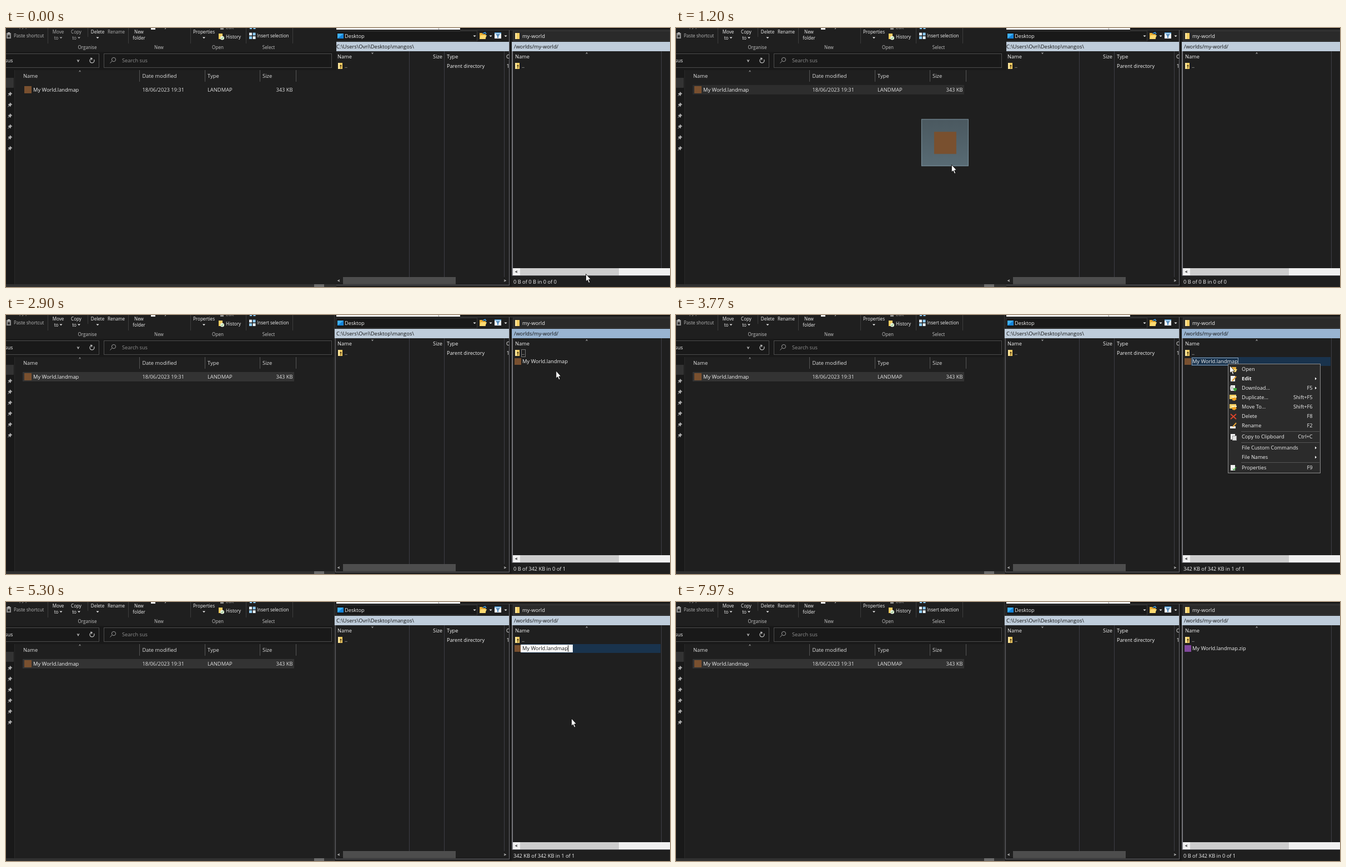
Animation of 1196 by 468 pixels, one loop 8030 ms. Source, as an HTML page with a canvas:

```html
<!DOCTYPE html>
<html lang="en">
<head>
<meta charset="utf-8">
<title>Renaming an uploaded file</title>
<style>
html, body { margin: 0; width: 100%; height: 100%; overflow: hidden; background: #1f1f1f; }
canvas { display: block; width: 1196px; height: 468px; }
</style>
</head>
<body>
<canvas id="stage" width="1196" height="468"></canvas>
<script>
const c = document.getElementById('stage').getContext('2d');
const LOOP = 8030, BROWN = '#79502f', PURPLE = '#81489c', YELLOW = '#f5cd62';
const FILE = 'My World.landmap';

// Pointer stops: time, x, y
const PATH = [
  [0, 1044, 444], [30, 1044, 444], [470, 104, 115], [800, 104, 115],
  [970, 143, 162], [1130, 370, 236], [1330, 720, 240], [1600, 1019, 150],
  [2400, 1019, 150], [2930, 990, 100], [3170, 990, 100], [3400, 997, 91],
  [3770, 997, 91], [4230, 1018, 205], [4570, 1018, 205], [4670, 1018, 210],
  [6100, 1018, 210], [6130, 1017, 210], [7270, 1017, 210], [7700, 108, 470], [LOOP, 108, 470]
];

// Label, middle y, shortcut, submenu
const MENU = [
  ['Open', 98], ['Edit', 115, '', 1], ['Download...', 132, 'F5', 1],
  ['Duplicate...', 149, 'Shift+F5'], ['Move To...', 166, 'Shift+F6'],
  ['Delete', 183, 'F8'], ['Rename', 200, 'F2'],
  ['Copy to Clipboard', 220, 'Ctrl+C'], ['File Custom Commands', 240, '', 1],
  ['File Names', 257, '', 1], ['Properties', 276, 'F9']
];

function rect(x, y, w, h, color) { c.fillStyle = color; c.fillRect(x, y, w, h); }
function frame(x, y, w, h, color) {
  c.strokeStyle = color; c.lineWidth = 1;
  c.strokeRect(x + .5, y + .5, w - 1, h - 1);
}
function line(color, width, ...p) {
  c.strokeStyle = color; c.lineWidth = width;
  c.beginPath();
  for (let i = 0; i < p.length; i += 2) c.lineTo(p[i], p[i + 1]);
  c.stroke();
}
function poly(color, ...p) {
  c.fillStyle = color;
  c.beginPath();
  for (let i = 0; i < p.length; i += 2) c.lineTo(p[i], p[i + 1]);
  c.closePath(); c.fill();
}
function font(size, bold) { c.font = `${bold ? 'bold ' : ''}${size}px "Open Sans", "Noto Sans", sans-serif`; }
function text(s, x, y, color = '#f2f2f2', size = 9.25, align = 'left', bold = false) {
  font(size, bold);
  c.fillStyle = color; c.textAlign = align;
  c.fillText(s, x, y + size * .36);
}
function caret(x, y, color = '#fff') { poly(color, x - 2.5, y - 1, x + 2.5, y - 1, x, y + 1.6); }
function chevron(x, y, dx, dy, color, width = 1) {
  // Points along (dx, dy)
  line(color, width, x - dx + dy, y - dy + dx, x + dx, y + dy, x - dx - dy, y - dy - dx);
}

function pointer(t) {
  let i = 0;
  while (i < PATH.length - 2 && t >= PATH[i + 1][0]) i++;
  const a = PATH[i], b = PATH[i + 1], d = b[0] - a[0], u = (t - a[0]) / d;
  const still = (p, q) => !p || !q || (p[1] === q[1] && p[2] === q[2]);
  const slope = (k, j) => still(PATH[k - 1], PATH[k]) || still(PATH[k], PATH[k + 1]) ? 0
    : (PATH[k + 1][j] - PATH[k - 1][j]) / (PATH[k + 1][0] - PATH[k - 1][0]) * d;
  return [1, 2].map(j => {
    const m = slope(i, j), n = slope(i + 1, j), e = u * u * (3 - 2 * u);
    return a[j] + (b[j] - a[j]) * e + m * u * (1 - u) ** 2 - n * u * u * (1 - u);
  });
}

function ribbon(enabled) {
  const dim = enabled ? '#f2f2f2' : '#b0b0b0';
  const small = (s, x, y, color = '#f2f2f2', align = 'center') => text(s, x, y, color, 8.1, align);
  for (const [x, h] of [[75, 28], [147, 16], [220, 28], [332, 28], [432, 28], [516, 28]]) rect(x, 0, 1, h, '#3d3d3d');
  small('Copy path', 14, -3, '#aaa', 'left');
  rect(1, 9, 8, 10, '#8d8d8d'); rect(3, 8, 4, 2, '#c5c5c5'); rect(3, 13, 4, 4, '#333');
  small('Paste shortcut', 14, 14, '#b8b8b8', 'left');
  small('Move', 94, 7, dim); small('to', 90.5, 18, dim); caret(99, 17.5, dim);
  small('Copy', 126.5, 7, dim); small('to', 123, 18, dim); caret(131.5, 17.5, dim);
  small('Delete', 165, 7); caret(165, 17.5);
  small('Rename', 198.5, 7, dim);
  small('New', 239.5, 7); small('folder', 239.5, 18);
  rect(261, 0, 8, 3, '#e8e8e8');
  small('Easy access', 273, -3, '#f2f2f2', 'left');
  small('Properties', 356.5, 7); caret(356.5, 17.5);
  rect(386, 0, 6, 3, '#888');
  small('Edit', 396, -1, '#999', 'left');
  rect(383, 10, 7, 10, YELLOW);
  c.fillStyle = '#e7f3e0'; c.beginPath(); c.arc(389.5, 18, 3.6, 0, 7); c.fill();
  line('#4b9a45', 1, 387.5, 18, 389, 19.5, 391.5, 16.5);
  small('History', 396, 16, '#f2f2f2', 'left');
  for (const x of [438, 444.5]) {
    rect(x + 1, 0, 4, 2, '#7fc0f0');
    rect(x, 8.5, 5, 5, x < 440 ? '#e8f5ff' : '#8dcbf5'); rect(x, 15, 5, 5, x < 440 ? '#8dcbf5' : '#e8f5ff');
  }
  small('Insert selection', 452, 14, '#f2f2f2', 'left');
  [['Organise', 146.5], ['New', 275.5], ['Open', 381.5], ['Select', 473]]
    .forEach(([s, x]) => small(s, x, 35, '#c4c4c4'));
}

function explorer(t) {
  rect(0, 0, 596, 468, '#1f1f1f');
  rect(0, 43, 596, 33, '#191919');
  rect(0, 76, 15, 387, '#191919');
  rect(15, 76, 1, 387, '#2a2a2a');
  ribbon(t >= 800);

  frame(-2, 46, 170, 26, '#4c4c4c');
  frame(176, 46, 411, 26, '#4c4c4c');
  text('sus', -2, 59);
  chevron(130, 59, 0, 1.7, '#c8c8c8', 1.2);
  c.strokeStyle = '#c8c8c8'; c.lineWidth = 1.2;
  c.beginPath(); c.arc(155, 59, 4, -.5, 4.6); c.stroke();
  line('#c8c8c8', 1.2, 152.2, 54.2, 155, 55, 154, 58);
  c.strokeStyle = '#999'; c.lineWidth = 1;
  c.beginPath(); c.arc(194, 57, 3.6, 0, 7); c.stroke();
  line('#999', 1, 191.2, 59.6, 187.5, 63.5);
  text('Search sus', 209, 59, '#8e8e8e');

  rect(0, 90, 14, 18, '#333');
  for (let i = 0; i < 6; i++) {
    const y = 119 + i * 19.6;
    poly('#aaa', 7, y - 4, 11.5, y, 9.5, y + .5, 8, y + 4, 3.5, y - .5, 7, y - 2);
    line('#aaa', 1, 6, y + 1, 3.5, y + 4);
  }

  [240, 358, 457, 522].forEach(x => rect(x, 76, 1, 21, '#555'));
  chevron(133, 78, 0, -1.3, '#999');
  [['Name', 31], ['Date modified', 245.5], ['Type', 363], ['Size', 462]]
    .forEach(([s, x]) => text(s, x, 87, '#dedede', 9.4));
  if (t > 435) rect(30, 103, 489, 17, t < 1600 ? '#2d2d2d' : '#333');
  rect(33, 105, 13, 13, BROWN);
  text(FILE, 49, 112, '#f2f2f2', 9.3);
  text('18/06/2023 19:31', 245.5, 112, '#dedede', 9.3);
  text('LANDMAP', 363, 112, '#dedede', 9.4);
  text('343 KB', 516.5, 112, '#dedede', 9.3, 'right');

  rect(0, 463, 596, 5, '#303030');
  rect(555, 463, 18, 5, '#6b6b6b');
}

function upFolder(x) {
  rect(x, 63, 8, 11, YELLOW); rect(x, 63, 3, 11, '#fbe49a');
  poly('#46391a', x + 3, 69, x + 5, 66, x + 7, 69);
  rect(x + 4.5, 68, 1, 5, '#46391a');
}

function localPane() {
  rect(595, 0, 223, 3, '#f2f2f2'); rect(779, 0, 1, 3, '#999');
  rect(818, 0, 378, 3, '#151515'); rect(818, 3, 378, 1, '#444');
  rect(594, 5, 255, 19, '#191919');
  frame(594, 5, 255, 19, '#383838');
  rect(597, 10, 11, 9, '#1683d8'); poly('#3fb0f4', 597, 10, 608, 10, 597, 19);
  text('Desktop', 610, 15);
  [844, 873, 900].forEach(x => caret(x, 14.5));
  poly('#e8ae35', 853, 9, 858, 9, 859, 11, 864, 11, 864, 20, 853, 20);
  poly('#ffdb72', 855, 13, 866, 13, 863, 20, 853, 20);
  line('#3d9be0', 1.5, 859, 10, 863, 8, 865, 11);
  rect(880, 8, 12, 11, '#f0f4f8'); rect(880, 8, 12, 2, '#5ba4dc');
  poly('#4a86b8', 882, 11, 890, 11, 887, 14.5, 887, 18, 885, 18, 885, 14.5);

  rect(592, 25, 315, 17, '#bfcddb');
  text('C:\\Users\\Ovri\\Desktop\\mangos\\', 595, 34, '#101010', 9.4);
  rect(593, 42, 1, 423, '#6a6a70');
  [726, 789, 897].forEach(x => rect(x, 42, 1, 408, '#3e3e46'));
  rect(906, 4, 1, 461, '#68686e');
  chevron(660, 45.5, 0, 1.3, '#aaa');
  text('Name', 597, 52); text('Size', 786, 52, '#f2f2f2', 9.25, 'right'); text('Type', 794, 52);
  upFolder(598);
  text('..', 610, 69); text('Parent directory', 794, 69, '#f2f2f2', 9.1);
  c.save();
  c.beginPath(); c.rect(890, 42, 16, 40); c.clip();
  text('Changed', 901, 52); text('18/06/2023', 901.5, 69);
  c.restore();
  rect(607, 450, 203, 13, '#4d4d4d');
  chevron(599.5, 456.5, -1.5, 0, '#c0c0c0', 1.2);
  chevron(898.5, 456.5, 1.5, 0, '#c0c0c0', 1.2);
  rect(593, 464, 314, 1, '#68686e');
}

function remoteFile(t) {
  const picked = t >= 3400 && t < 6630, renamed = t >= 6470;
  if (picked) rect(928, 76, 251, 16, '#19334d');
  rect(916, 78, 12, 12, t >= 6630 ? PURPLE : BROWN);
  if (t >= 4670 && t < 6470) {
    const typed = [5700, 5870, 5930, 6100].filter(k => t >= k).length;
    const name = FILE + '.zip'.slice(0, typed);
    font(9.25);
    const end = 930 + c.measureText(name).width;
    rect(927, 77, end + 9 - 927, 14, '#fff');
    text(name, 930, 84, '#111');
    if (t < 5300) {
      rect(930, 78, c.measureText('My World').width, 12, '#0078d7');
      text('My World', 930, 84, '#fff');
    } else rect(Math.round(end), 78, 1, 12, '#111');
    return;
  }
  const name = renamed ? FILE + '.zip' : FILE;
  text(name, 930, 84);
  if (t >= 3400 && t < 7970) frame(929, 77, renamed ? 99 : 84, 14, picked ? '#8ea3b8' : '#a0a0a0');
}

function remotePane(t) {
  const active = (t >= 2030 && t < 4570) || (t >= 6530 && t < 7970);
  rect(913, 5, 283, 19, '#2a2a2a');
  frame(913, 5, 290, 19, '#3a3a3a');
  rect(917, 9, 8, 11, YELLOW); rect(917, 9, 3, 11, '#fbe49a');
  text('my-world', 930, 15);
  rect(911, 25, 285, 17, active ? '#99b4d1' : '#bfcddb');
  text('/worlds/my-world/', 915, 34, '#101010');
  rect(911, 42, 2, 406, '#77777c');
  rect(1180, 42, 1, 392, '#3e3e46');
  chevron(1046, 45.5, 0, -1.3, '#aaa');
  text('Name', 917, 52);
  upFolder(917);
  text('..', 929, 69);
  if (t >= 2030 && t < 3400) frame(928, 62, 8, 14, '#777');
  if (t >= 2400) remoteFile(t);
  rect(913, 434, 283, 13, '#f0f0f0');
  rect(926, 434, 178, 13, '#cdcdcd');
  chevron(919.5, 440.5, -1.5, 0, '#333', 1.3);
  rect(911, 447, 285, 1, '#55555a');
  const status = t < 2400 ? '0 B of 0 B in 0 of 0'
    : t >= 3400 && t < 6630 ? '342 KB of 342 KB in 1 of 1' : '0 B of 342 KB in 0 of 1';
  text(status, 914, 459);
}

function menuIcon(i, y) {
  const page = (x, top) => rect(x, top, 8, 10, '#f0f0f0');
  if (i === 0) {
    rect(998, y - 4, 11, 9, '#e6ad3b'); poly('#ffdc78', 1000, y, 1011, y, 1008, y + 5, 998, y + 5);
  } else if (i === 3 || i === 4) {
    rect(997, y - 5, 12, 8, YELLOW); rect(1000, y - 2, 10, 2, '#fff1bd');
    poly('#f0a020', 1002, y + 1, 1006, y + 1, 1006, y - 1, 1010, y + 3, 1006, y + 6, 1002, y + 5);
  } else if (i === 5) {
    line('#e0442a', 1.8, 999, y - 4, 1009, y + 5); line('#e0442a', 1.8, 1009, y - 4, 999, y + 5);
  } else if (i === 6) {
    rect(998, y + 1, 10, 4, '#f0f0f0'); line('#e3a033', 2, 1003, y + 2, 1009, y - 5);
  } else if (i < 8 || i === 10) {
    page(999, y - 5);
    if (i === 1) line('#e3a033', 2, 1002, y + 4, 1009, y - 4);
    if (i === 2) { rect(998, y - 3, 6, 6, '#ccc'); poly('#3ba53b', 1004, y, 1010, y, 1010, y + 3, 1007, y + 6, 1004, y + 3); }
    if (i === 7) { rect(1002, y - 2, 8, 9, '#999'); rect(1003, y - 1, 6, 7, '#e4e4e4'); }
    if (i === 10) line('#3ba53b', 1.5, 1003, y + 2, 1005, y + 4, 1009, y - 1);
  }
}

function menu(t, py) {
  rect(994, 88, 167, 198, '#2b2b2b');
  frame(994, 88, 167, 198, '#8c8c8c');
  MENU.forEach(([label, y, keys, sub], i) => {
    if (t > 3800 && Math.abs(py - y) < 8.5) rect(995, y - 8, 164, 17, '#454545');
    menuIcon(i, y);
    text(label, 1019, y, '#f2f2f2', 9.2, 'left', i === 1);
    if (keys) text(keys, 1146.5, y, '#f2f2f2', 9.2, 'right');
    if (sub) poly('#f2f2f2', 1151, y - 2.5, 1154, y, 1151, y + 2.5);
  });
  [210, 230, 266].forEach(y => rect(1018, y, 141, 1, '#555'));
}

function ghost(x, y) {
  const g = c.createLinearGradient(0, y, 0, y + 85);
  g.addColorStop(0, 'rgba(118,146,160,.5)');
  g.addColorStop(1, 'rgba(130,162,178,.58)');
  rect(x, y, 85, 85, g);
  frame(x, y, 85, 85, 'rgba(150,175,190,.65)');
  rect(x + 23, y + 23, 40, 40, BROWN);
}

function arrow(x, y) {
  c.save();
  c.translate(x, y);
  c.beginPath();
  [[.5, .5], [.5, 14], [3.4, 11.3], [5.6, 16.6], [7.8, 15.6], [5.6, 10.6], [9.4, 10.3]]
    .forEach(p => c.lineTo(...p));
  c.closePath();
  c.fillStyle = '#fff'; c.fill();
  c.strokeStyle = '#000'; c.lineWidth = .8; c.stroke();
  c.restore();
}

function hourglass(x, y) {
  rect(x - 5, y - 8, 10, 16, '#000');
  rect(x - 4, y - 7, 8, 2, '#fff'); rect(x - 4, y + 5, 8, 2, '#fff');
  poly('#fff', x - 3, y - 4, x + 3, y - 4, x, y);
  poly('#fff', x - 3, y + 4, x + 3, y + 4, x, y);
}

function copyBadge(x, y) {
  rect(x + 9, y + 18, 10, 10, '#fff');
  frame(x + 9, y + 18, 10, 10, '#000');
  rect(x + 11, y + 22.5, 6, 1, '#000'); rect(x + 13.5, y + 20, 1, 6, '#000');
}

function draw(t) {
  const [x, y] = pointer(t), edge = t < 1870 ? 595 : 591;
  explorer(t);
  c.save();
  c.beginPath(); c.rect(edge, 0, 1196 - edge, 468); c.clip();
  rect(edge, 0, 1196 - edge, 468, '#1f1f1f');
  if (t >= 1870) rect(591, 0, 1, 468, '#3a3a3a');
  localPane();
  rect(907, 4, 4, 464, '#191919');
  remotePane(t);
  c.restore();
  if (t >= 3500 && t < 4570) menu(t, y);
  const dragging = t >= 870 && t < 1640;
  if (dragging && x < 596) ghost(x - 54, y - 82);
  if (t >= 1870 && t < 1930) hourglass(1023, 152);
  else arrow(x, y);
  if (dragging && x >= 596) copyBadge(x, y);
}

const start = performance.now();
function tick() {
  draw((performance.now() - start) % LOOP);
  requestAnimationFrame(tick);
}
tick();
</script>
</body>
</html>
```
